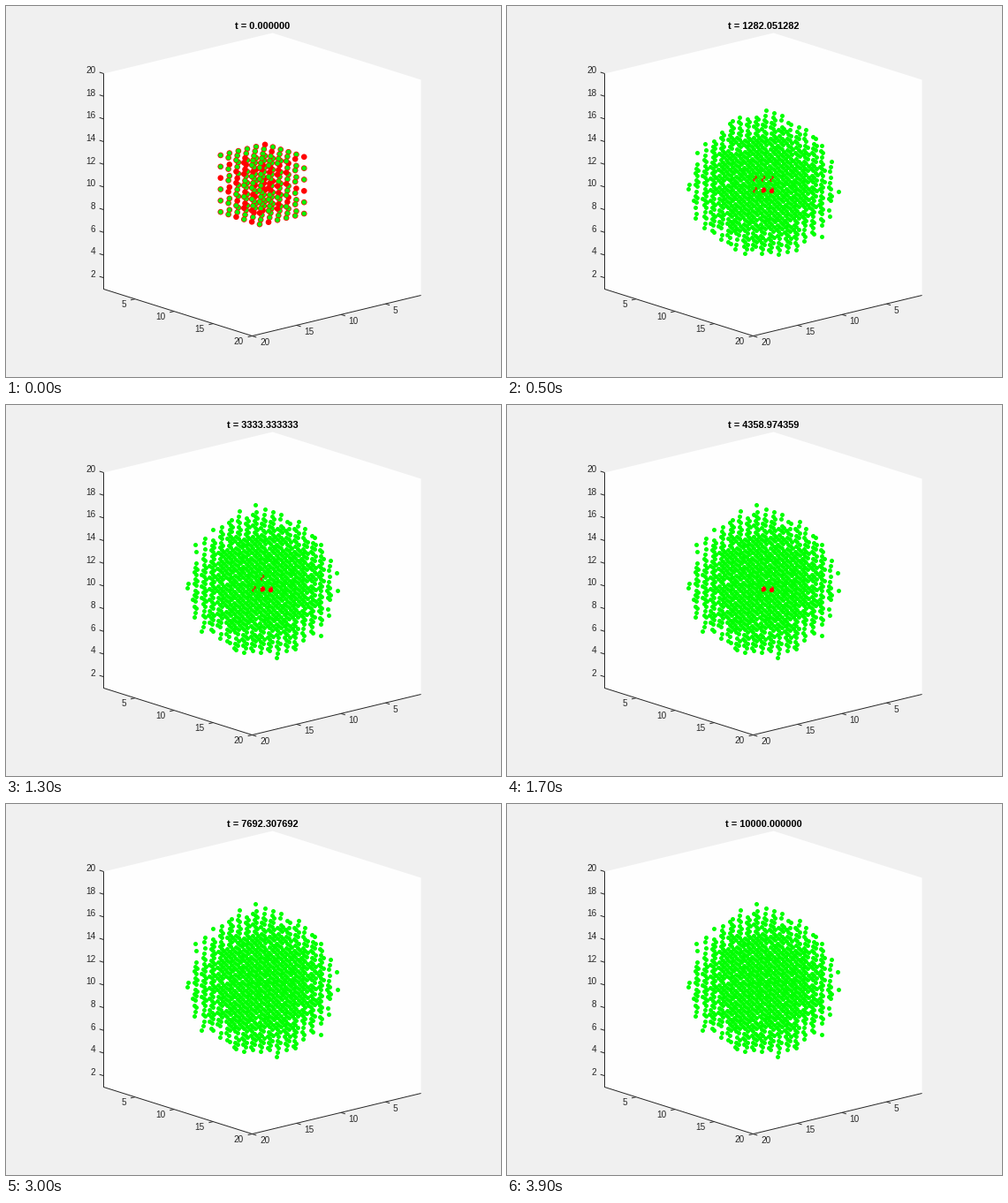
Recreate the animation shown at these times as a matplotlib script. Size 560 by 420 pixels, loop 4 s.

```python
import itertools

import matplotlib.pyplot as plt
import numpy as np
from matplotlib.animation import FuncAnimation
from matplotlib.collections import LineCollection

W, H, DPI = 560, 420, 100
FRAMES, INTERVAL = 40, 100
PX = 72 / DPI
GREEN, RED, INK = "#00ff00", "#ff0000", "#262626"

# Parallel projection of the 1..20 box, in pixels
BACK = np.array([302, 275])
STEPS = np.array([[168, 53], [-191, 46], [0, -244]]) / 19
UNIT = STEPS / np.linalg.norm(STEPS, axis=1)[:, None]
# Lattice direction that points at the viewer
VIEW = np.cross(STEPS[:, 0], STEPS[:, 1])
VIEW = VIEW / VIEW[0]
MID = 9.5

# Columns and layers of the core, in the order their red marks vanish
CORE = [(1, 10), (-1, 10), (0, 10), (-1, 9), (0, 9), (1, 9)]
CURL_Y = np.linspace(-3, 3, 13)
CURL = np.column_stack([-1.8 * np.sin(np.pi * CURL_Y / 3), CURL_Y])


def project(cells):
    return BACK + np.asarray(cells) @ STEPS


def area(diameter):
    return (diameter * PX) ** 2


def ball_radius(frame):
    """Quick growth that levels off, with a few late stragglers."""
    return 6.28 - 3.1 * np.exp(-frame / 1.3) - 0.05 * np.exp(-frame / 5)


def core_reach(frame):
    """Distance from the middle within which red still shows early on."""
    return 3.4 * np.exp(-0.3 * frame)


rng = np.random.default_rng(7)
lattice = np.array(list(itertools.product(range(20), repeat=3)))
lattice = lattice[np.argsort(lattice @ VIEW, kind="stable")]
spots = project(lattice)
radius = np.linalg.norm(lattice - MID, axis=1)
score = radius + np.clip(rng.normal(0, 0.3, len(lattice)), -0.75, 0.75)
in_cube = np.abs(lattice - MID).max(axis=1) < 3

# Each seed cell is a red dot, most of them with a smaller green dot on top
seed_spots = np.repeat(spots[in_cube], 2, axis=0)
green_size = np.where(rng.random(in_cube.sum()) < 0.35, 0, area(5.1))
seed_sizes = np.column_stack(
    [np.full(len(green_size), area(6.6)), green_size]).ravel()
seed_colors = [RED, GREEN] * len(green_size)

core_spots = project([(MID + k / 2, MID - k / 2, z) for k, z in CORE])

fig = plt.figure(figsize=(W / DPI, H / DPI), dpi=DPI, facecolor="#f0f0f0")
ax = fig.add_axes([0, 0, 1, 1])
ax.set_xlim(0.5, W + 0.5)
ax.set_ylim(H + 0.5, 0.5)
ax.axis("off")


def line(*points):
    ax.plot(*zip(*points), color=INK, lw=0.7, solid_capstyle="butt")


def tick(cell, direction, value, shift, ha):
    p = project(cell)
    line(p, p + 5 * direction)
    x, y = p + shift
    ax.text(x, y, str(value), family="Liberation Sans", size=10 * PX,
            color=INK, ha=ha, va="center_baseline")


def draw_box():
    left, front, right = project([(0, 19, 0), (19, 19, 0), (19, 0, 0)])
    rise = 19 * STEPS[2]
    ax.fill(*zip(left, front, right, right + rise, BACK + rise, left + rise),
            color="#fefefe", lw=0)
    line(left + rise, left, front, right)
    for n in range(2, 21, 2):
        tick((0, 19, n - 1), -UNIT[0], n, (-9, -4.5), "right")
    for n in range(5, 21, 5):
        tick((n - 1, 19, 0), UNIT[1], n, (-10, 5.8), "right")
        tick((19, n - 1, 0), UNIT[0], n, (8.5, 7), "left")


draw_box()
title = ax.text(291, 26, "", family="Liberation Sans", weight="bold",
                size=11 * PX, color="black", ha="center", va="baseline")
dots = ax.scatter([], [], lw=0, zorder=3)
core = ax.scatter([], [], s=area(5.4), color=RED, lw=0, zorder=4)
curls = LineCollection([], colors=RED, linewidths=0.8, zorder=4)
ax.add_collection(curls)


def set_dots(xy, sizes, colors):
    dots.set_offsets(xy)
    dots.set_sizes(sizes)
    dots.set_facecolors(colors)


def update(frame):
    title.set_text(f"t = {frame * 10000 / (FRAMES - 1):.6f}")
    if frame == 0:
        set_dots(seed_spots, seed_sizes, seed_colors)
        marks = core_spots[:0]
    else:
        alive = in_cube | (score < ball_radius(frame))
        set_dots(spots[alive], [area(5)], [GREEN])
        # One mark goes every third frame, starting with the eighth
        gone = max(0, (frame - 5) // 3)
        marks = core_spots[gone:]
    early = spots[in_cube & (radius < core_reach(frame)) & (0 < frame < 5)]
    curls.set_segments([CURL + p for p in (*marks, *early)])
    core.set_offsets(marks[-2:])
    return dots, core, curls, title


anim = FuncAnimation(fig, update, frames=FRAMES, interval=INTERVAL,
                     init_func=lambda: update(0), repeat=True,
                     repeat_delay=0, blit=False)
plt.show()
```
